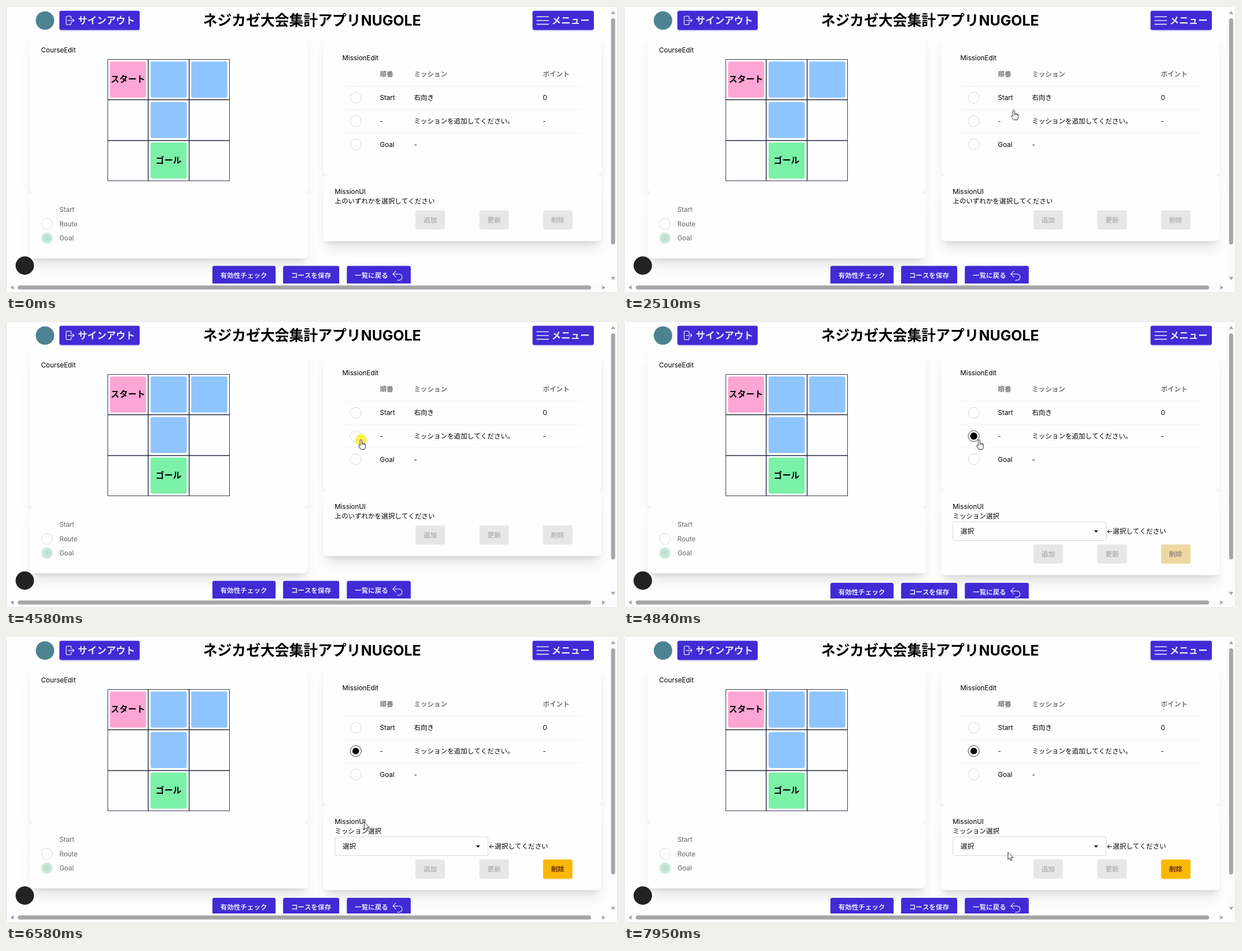
Write an HTML page with a canvas that moves like this. It is 1091 by 513 pixels and loops after 8000 ms.

```html
<!DOCTYPE html>
<html lang="ja">
<head>
<meta charset="utf-8">
<title>Course editor</title>
<style>
html, body { margin: 0; width: 100%; height: 100%; overflow: hidden; background: #fff; }
canvas { display: block; width: 1091px; height: 513px; }
</style>
</head>
<body>
<canvas id="stage"></canvas>
<script>
const W = 1091, H = 513, LOOP = 8000;
const canvas = document.getElementById('stage');
const ctx = canvas.getContext('2d');
const dpr = window.devicePixelRatio || 1;
canvas.width = Math.round(W * dpr);
canvas.height = Math.round(H * dpr);

const FONT = "Inter, 'Noto Sans CJK JP', 'Noto Sans CJK', sans-serif";
const SIZE = 11.9;
const INK = '#000', PAPER = '#fefefe', PRIMARY = '#422ad5', ON_PRIMARY = '#e0e7ff';
const DISABLED = '#e7e7e7', FAINT = '#b4b4b4';
const ENTER_AT = 450, PRESS_AT = 4580, SELECT_AT = 4780;
const STEP = 70;

const ICONS = {
  exit: new Path2D('M15.75 9V5.25A2.25 2.25 0 0 0 13.5 3h-6a2.25 2.25 0 0 0-2.25 2.25v13.5A2.25 2.25 0 0 0 7.5 21h6a2.25 2.25 0 0 0 2.25-2.25V15m3 0 3-3m0 0-3-3m3 3H9'),
  bars: new Path2D('M3.75 6.75h16.5M3.75 12h16.5M3.75 17.25h16.5'),
  back: new Path2D('M9 15 3 9m0 0 6-6M3 9h12a6 6 0 0 1 0 12h-3')
};
const ARROW = new Path2D('M.5 .5V13.8L3.6 10.9 5.6 15.6 7.7 14.7 5.7 10.1H9.8Z');
const HAND = new Path2D('M-1.7 11V1.9a1.6 1.6 0 0 1 3.2 0V6.4a1.4 1.4 0 0 1 2.4 .5a1.3 1.3 0 0 1 2.2 .8a1.2 1.2 0 0 1 1.5 1.2V12.5Q7.5 15 6 17.5H-.5L-4.5 11.6A1.3 1.3 0 0 1-2.6 10Z');

// Each glide starts where the last one ended; bend bows its path sideways
const glide = (start, end, to, bend = [0, 0]) => ({ start, end, to, bend });
const ENTRY = [1130, 580];
const GLIDES = [
  glide(ENTER_AT, 1000, [661, 210]),
  glide(1200, 1400, [659, 214], [5, 0]),
  glide(1600, 2380, [621, 187], [-29, 20]),
  glide(2460, 3210, [811, 223], [168, -26]),
  glide(3280, 4050, [633, 212], [-22, 0]),
  glide(5380, 5920, [686, 368], [12, 20]),
  glide(6450, 7190, [732, 376], [-125, -77]),
  glide(7260, 7470, [623, 397], [45, 5]),
  glide(7670, 7950, [684, 386])
];

function cursorAt(t) {
  let pos = ENTRY;
  for (const { start, end, to, bend } of GLIDES) {
    if (t < start) break;
    const steps = Math.round((end - start) / STEP) + 1;
    const k = Math.min(1, (Math.floor((t - start) / STEP) + 1) / steps);
    const eased = 1 - (1 - k) ** 2, bow = Math.sin(Math.PI * k);
    pos = pos.map((v, i) => v + (to[i] - v) * eased + bend[i] * bow);
  }
  return pos.map(Math.round);
}

function paint(fill, stroke, line) {
  if (fill) { ctx.fillStyle = fill; ctx.fill(); }
  if (stroke) { ctx.strokeStyle = stroke; ctx.lineWidth = line; ctx.stroke(); }
}

function box(x, y, w, h, r, fill, stroke, line = 0.85) {
  ctx.beginPath();
  ctx.roundRect(x, y, w, h, r);
  paint(fill, stroke, line);
}

function disc(x, y, r, fill, stroke, line = 0.85) {
  ctx.beginPath();
  ctx.arc(x, y, r, 0, Math.PI * 2);
  paint(fill, stroke, line);
}

// Triangle with its base centre at x, y, pointing along angle
function triangle(x, y, angle, half, length, fill) {
  ctx.save();
  ctx.translate(x, y);
  ctx.rotate(angle);
  ctx.beginPath();
  ctx.moveTo(0, -half);
  ctx.lineTo(length, 0);
  ctx.lineTo(0, half);
  paint(fill);
  ctx.restore();
}

// y is the optical middle of the line
function label(str, x, y, { size = SIZE, weight = 400, color = INK, align = 'left' } = {}) {
  ctx.font = `${weight} ${size}px ${FONT}`;
  ctx.textAlign = align;
  ctx.fillStyle = color;
  ctx.fillText(str, x, Math.round(y + size * 0.37));
}

function icon(path, x, y, scale, line) {
  ctx.save();
  ctx.translate(x, y);
  ctx.scale(scale, scale);
  ctx.lineCap = ctx.lineJoin = 'round';
  ctx.strokeStyle = ON_PRIMARY;
  ctx.lineWidth = line;
  ctx.stroke(path);
  ctx.restore();
}

// Box shadow with a negative spread, hidden behind the box drawn later
function shadow(x, y, w, h, spread, dy, blur, color) {
  ctx.save();
  ctx.shadowColor = color;
  ctx.shadowOffsetY = dy * dpr;
  ctx.shadowBlur = blur * dpr;
  box(x + spread, y + spread, w - 2 * spread, h - 2 * spread, 3, '#fff');
  ctx.restore();
}

function card(x, y, w, h) {
  shadow(x, y, w, h, 4.2, 17, 21, 'rgba(0,0,0,.1)');
  shadow(x, y, w, h, 5, 6.8, 8.5, 'rgba(0,0,0,.1)');
  box(x, y, w, h, 6.8, PAPER);
}

function button(x, y, w, fill, glow) {
  if (glow) shadow(x, y, w, 34.2, 1.7, 3, 2.5, glow);
  box(x, y, w, 34.2, 3.4, fill);
}

const primary = (x, y, w) => button(x, y, w, PRIMARY, 'rgba(66,42,213,.4)');

function action(str, x, y, fill = DISABLED, color = FAINT, glow) {
  button(x, y, 52.5, fill, glow);
  label(str, x + 26.2, y + 17.1, { weight: 600, color, align: 'center' });
}

function header() {
  const text = { size: 17, weight: 600, color: ON_PRIMARY };
  disc(69.5, 26, 16.5, '#4d8391');
  primary(95.2, 8.6, 143.2);
  icon(ICONS.exit, 102.8, 15.6, 0.85, 1.5);
  label('サインアウト', 128, 25.8, text);
  label('ネジカゼ大会集計アプリNUGOLE', 545.5, 25.6, { size: 25.6, weight: 700, align: 'center' });
  primary(938.6, 8.6, 109.4);
  icon(ICONS.bars, 941.5, 10.7, 1.27, 1.25);
  label('メニュー', 972.5, 25.8, text);
}

function course() {
  card(42, 50, 496, 283);
  card(42, 333, 496, 118);
  label('CourseEdit', 62.6, 79);

  const x0 = 181.4, y0 = 95.5, cell = 72.4, side = 3 * cell;
  const crisp = v => Math.floor(v) + 0.5;
  ctx.strokeStyle = '#1c2438';
  for (let i = 0; i < 4; i++) {
    const x = crisp(x0 + i * cell), y = crisp(y0 + i * cell);
    ctx.lineWidth = i % 3 ? 1.4 : 0.9;
    ctx.beginPath();
    ctx.moveTo(x, y0); ctx.lineTo(x, y0 + side);
    ctx.moveTo(x0, y); ctx.lineTo(x0 + side, y);
    ctx.stroke();
  }
  const tile = (col, row, fill, str) => {
    const x = x0 + col * cell + 4, y = y0 + row * cell + 3.8;
    box(x, y, 64.4, 64.4, 3.4, fill);
    if (str) label(str, x + 32, y + 31.5, { size: 15.3, weight: 700, align: 'center' });
  };
  const route = '#8ec5ff';
  tile(0, 0, '#fda5d5', 'スタート');
  tile(1, 0, route);
  tile(2, 0, route);
  tile(1, 1, route);
  tile(1, 2, '#7bf1a8', 'ゴール');

  const legend = (str, i, fill, ring) => {
    const y = 364 + i * 25.4;
    disc(73, y, 9.9, fill, ring);
    label(str, 95.2, y, { color: '#666' });
  };
  legend('Start', 0, null, '#f7f7f7');
  legend('Route', 1, null, '#d4d4d4');
  legend('Goal', 2, '#cdebdc', '#cdebdc');
  disc(73, 414.8, 6.2, '#bfe0d0');
}

function missions(t) {
  card(565.5, 50, 496, 252);
  label('MissionEdit', 599.6, 92.5);
  disc(623.5, 122.3, 9.8, null, '#f9f9f9');

  const columns = [666.6, 727.2, 957];
  const line = (cells, y, style) => cells.forEach((s, i) => label(s, columns[i], y, style));
  line(['順番', 'ミッション', 'ポイント'], 122, { weight: 700, color: '#747474' });
  const rows = [
    ['Start', '右向き', '0'],
    ['-', 'ミッションを追加してください。', '-'],
    ['Goal', '-']
  ];
  rows.forEach((cells, i) => {
    const y = 164 + i * 41.65;
    const on = i === 1 && t >= SELECT_AT;
    ctx.fillStyle = '#f2f2f2';
    ctx.fillRect(600, y - 21, 427, 0.9);
    line(cells, y);
    disc(623.5, y, 9.8, null, on ? '#161616' : '#cfcfcf');
    if (on) {
      const k = fade(t);
      disc(623.5, y, 5.1 + 0.85 * k + 1.25 * Math.sin(Math.PI * k), '#000');
    }
  });
}

const fade = t => Math.max(0, Math.min(1, (t - SELECT_AT) / 200));

function mix(a, b, k) {
  return `rgb(${a.map((v, i) => Math.round(v + (b[i] - v) * k))})`;
}

function missionPanel(t) {
  const open = t >= SELECT_AT, k = fade(t);
  const y = open ? 399.6 : 365.3;
  card(565.5, 302, 496, y - 247.3);
  label('MissionUI', 586, 331.5);
  label(open ? 'ミッション選択' : '上のいずれかを選択してください', 586, 349);
  if (open) {
    box(586.4, 358.9, 273, 33.6, 3.4, null, '#cfcfcf');
    label('選択', 600, 375.5);
    triangle(841.5, 374.2, Math.PI / 2, 3.7, 4, '#111');
    label('←選択してください', 860, 375.5);
  }
  action('追加', 730, y);
  action('更新', 844, y);
  action('削除', 957.4, y,
    mix([231, 231, 231], [252, 183, 0], k),
    mix([180, 180, 180], [105, 42, 5], k),
    `rgba(252,183,0,${0.4 * k})`);
}

function footer(t) {
  const y = t >= SELECT_AT ? 468 : 464.4, mid = y + 16.8;
  const link = (str, x, w) => {
    primary(x, y, w);
    label(str, x + 14.2, mid, { weight: 600, color: ON_PRIMARY });
  };
  link('有効性チェック', 368, 112.6);
  link('コースを保存', 494, 100);
  link('一覧に戻る', 607.6, 114);
  icon(ICONS.back, 686.8, mid - 10.4, 0.92, 1.3);
  disc(33.5, 464, 16.4, '#222');
}

function scrollbars() {
  const gray = '#a6a6a6', right = 1082.3, bottom = 503.2, half = Math.PI / 2;
  ctx.fillStyle = '#fcfcfc';
  ctx.fillRect(0, 496, W, 17);
  ctx.fillRect(1075, 0, 16, H);
  box(21, bottom - 3.6, 1022, 7.2, 3.6, gray);
  box(right - 3.6, 22, 7.2, 404, 3.6, gray);
  triangle(right, 14.6, -half, 3.9, 5.8, gray);
  triangle(right, 484.2, half, 3.9, 5.8, gray);
  triangle(13.6, bottom, Math.PI, 3.9, 5.8, gray);
  triangle(1062.6, bottom, 0, 3.9, 5.8, gray);
  box(0.5, 0.5, W - 1, H - 1, 5, null, '#dedede', 1);
}

function pointer(t) {
  if (t < ENTER_AT) return;
  const [x, y] = cursorAt(t);
  if (t >= PRESS_AT && t < SELECT_AT) disc(x - 0.4, y + 0.5, 10.3, 'rgba(255,236,20,.75)');
  const overRow = x > 600 && x < 1027 && y > 185 && y < 226;
  const shape = overRow ? HAND : ARROW;
  ctx.save();
  ctx.translate(x, y);
  ctx.fillStyle = '#fff';
  ctx.fill(shape);
  ctx.strokeStyle = '#2a2a2a';
  ctx.lineWidth = 1;
  ctx.lineJoin = 'round';
  ctx.stroke(shape);
  if (overRow) {
    ctx.beginPath();
    for (let i = 0; i < 3; i++) {
      ctx.moveTo(1.5 + i * 2.3, 7);
      ctx.lineTo(1.5 + i * 2.3, 9.5);
    }
    ctx.stroke();
  }
  ctx.restore();
}

function draw(t) {
  ctx.setTransform(dpr, 0, 0, dpr, 0, 0);
  ctx.fillStyle = PAPER;
  ctx.fillRect(0, 0, W, H);
  course();
  missions(t);
  missionPanel(t);
  header();
  footer(t);
  scrollbars();
  pointer(t);
}

const begin = performance.now();
function tick() {
  draw((performance.now() - begin) % LOOP);
  requestAnimationFrame(tick);
}
tick();
</script>
</body>
</html>
```
